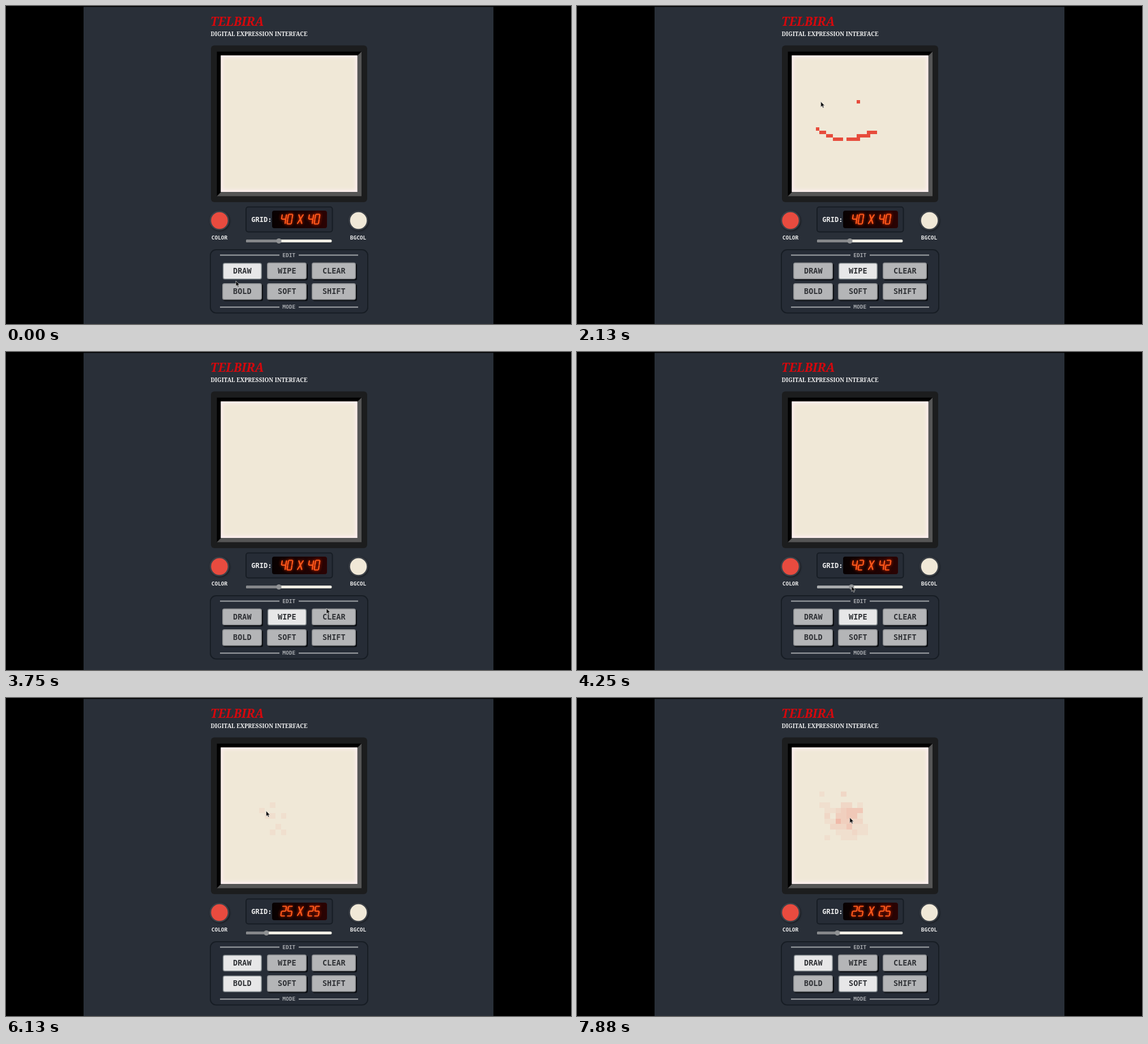
Recreate the animation shown at these times as an HTML page. Size 998 px wide and 561 px high, loop 8000 ms.

```html
<!DOCTYPE html>
<html lang="en">
<head>
<meta charset="utf-8">
<title>Pixel sketch pad</title>
<style>
  html, body { margin: 0; width: 100%; height: 100%; overflow: hidden; background: #000; }
  svg { display: block; width: 998px; height: 561px; }
  text { font: bold 9.5px "DejaVu Sans Mono", monospace; fill: #eee; text-anchor: middle; }
  .title { font: italic bold 21.1px "Noto Serif", serif; fill: #d4080d; text-anchor: start; }
  .sub { font: bold 9.95px "Noto Serif", serif; fill: #f2f2f2; text-anchor: start; }
  .grid { font-size: 12px; }
  .rule { fill: #a6a9ad; }
  .key { font-size: 13.5px; fill: #303236; }
  .box { fill: #262c36; stroke: #171d24; stroke-width: 2; }
  .knob { stroke: #3c4148; stroke-width: 2.6; filter: drop-shadow(1px 1px 1.5px #0008); }
  #led path { fill: none; stroke: #ff5a1c; stroke-width: 2.2; stroke-linecap: round; }
  #led { filter: drop-shadow(0 0 2.5px #f30); }
</style>
</head>
<body>
<svg viewBox="0 0 998 561">
  <defs>
    <linearGradient id="ledBack"><stop stop-color="#070101"/><stop offset="1" stop-color="#2b0303"/></linearGradient>
    <filter id="blur" x="-10%" y="-10%" width="120%" height="120%"><feGaussianBlur stdDeviation="3"/></filter>
    <clipPath id="paper"><rect x="379.5" y="87.2" width="241" height="240.8"/></clipPath>
  </defs>
  <rect x="137" y="1.5" width="724" height="559.5" fill="#292f38"/>
  <text class="title" x="361" y="35">TELBIRA</text>
  <text class="sub" x="361.5" y="52.6">DIGITAL EXPRESSION INTERFACE</text>

  <rect x="362" y="69.5" width="276" height="276.5" rx="6" fill="#1c1d1e"/>
  <path d="M372.5 80.5H628L620.5 88V328H380L372.5 335.5Z" fill="#000"/>
  <path d="M628 80.5V335.5H372.5L380 328H620.5V88Z" fill="#555"/>
  <g clip-path="url(#paper)">
    <rect x="379" y="87" width="242" height="242" fill="#f0e8d7"/>
    <rect x="378" y="86" width="244" height="243" fill="none" stroke="#fff0f4" stroke-width="8" filter="url(#blur)"/>
    <g id="cells" fill="#e74c3c" shape-rendering="crispEdges"></g>
  </g>

  <circle class="knob" cx="377" cy="378.5" r="16" fill="#e84b3f"/>
  <circle class="knob" cx="622.5" cy="378.5" r="16" fill="#f0e8d7"/>
  <text x="377" y="411.7">COLOR</text>
  <text x="622" y="411.7">BGCOL</text>

  <rect class="box" x="424" y="354.5" width="152.5" height="44" rx="4"/>
  <text class="grid" x="451.3" y="381">GRID:</text>
  <rect x="470" y="361" width="97" height="31" rx="4" fill="url(#ledBack)"/>
  <g id="led"></g>

  <rect x="424" y="412" width="151.5" height="5" rx="2.5" fill="#f0ede4"/>
  <rect id="track" x="424" y="412" height="5" rx="2.5"/>
  <circle id="thumb" cy="414.5" r="4.6" fill="#909294"/>

  <rect class="box" x="361" y="430" width="278" height="111.5" rx="10"/>
  <path d="M378 439.5H483M517 439.5H622M378 531.2H483M517 531.2H622" stroke="#a0a3a7" stroke-width="2"/>
  <text class="rule" x="499.7" y="442.6">EDIT</text>
  <text class="rule" x="499.7" y="534.4">MODE</text>
  <g id="keys"></g>
  <path id="cursor" d="M0 0V9.4L2.2 7.5L3.7 10.8L5.3 10.1L3.9 6.9H6.7Z" fill="#0c0c0c" stroke="#ddd" stroke-width=".7"/>
</svg>
<script>
const LOOP = 8000, STEP = 125;
const $ = id => document.getElementById(id);
const paper = { x: 379.5, y: 87.5, size: 241 };
const between = (t, from, to) => t >= from && t < to;

// Buttons
const keys = [["DRAW", "WIPE", "CLEAR"], ["BOLD", "SOFT", "SHIFT"]].flatMap((row, r) =>
  row.map((label, c) => ({ label, x: 382 + 79 * c, y: 452.5 + 36.5 * r, w: c < 2 ? 70 : 78 })));
const lit = {
  DRAW: t => !between(t, 1875, 5375),
  WIPE: t => between(t, 1875, 5500),
  CLEAR: t => t === 3500,
  BOLD: t => between(t, 5125, 7500),
  SOFT: t => t >= 7500,
  SHIFT: () => false
};

// Places the pointer visits
const middle = (col, row) => [paper.x + (col + .5) * paper.size / 40, paper.y + (row + .5) * paper.size / 40];
const smileRow = c => Math.round(24.2 - (c < 15 ? .0516 : .03) * (c - 15) ** 2);
const onSmile = c => middle(c, smileRow(c));
const onKey = name => {
  const k = keys.find(k => k.label === name);
  return [k.x + k.w / 2 + 15, k.y + 13];
};
const thumbX = size => 482 + (size - 40) * 1.47;
const onThumb = size => [thumbX(size), 413];
const eyes = [middle(8, 13), middle(19, 13)];

function scribble(t) {
  const s = (t - 7875) / 1000;
  return [475 + 22 * Math.sin(.32 + 7.81 * s), 206 + 28 * Math.sin(.18 + 16.12 * s)];
}

const stops = [
  [0, 406, 485], [500, ...eyes[0]], [625, ...eyes[0]], [1000, ...eyes[1]],
  [1125, ...onSmile(7)], [1375, ...onSmile(24)], [1500, 528, 441], [1875, ...onKey("WIPE")],
  [2125, ...eyes[0]], [2500, ...eyes[1]], [2875, ...onSmile(16)], [3125, ...onSmile(22)],
  [3250, ...onSmile(24)], [3500, ...onKey("CLEAR")], [3625, ...onKey("CLEAR")],
  [4125, ...onThumb(40)], [4250, ...onThumb(42)], [4500, ...onThumb(42)], [4875, ...onThumb(25)],
  [5125, ...onKey("BOLD")], [5375, ...onKey("DRAW")], [6000, ...scribble(6000)],
  [7125, ...scribble(7125)], [7500, ...onKey("SOFT")], [7625, ...scribble(7625)]
];
const sizes = [[0, 40], [4125, 40], [4250, 42], [4500, 42], [4875, 25]];

function at(track, t) {
  const i = track.findIndex(k => k[0] > t);
  if (i < 0) return track[track.length - 1].slice(1);
  const a = track[i - 1], b = track[i], f = (t - a[0]) / (b[0] - a[0]);
  return a.slice(1).map((v, j) => v + (b[j + 1] - v) * f);
}

const pointer = t => between(t, 6000, 7126) || t >= 7625 ? scribble(t) : at(stops, t);

// Airbrush: a seeded cloud of faint cells around a centre, appearing over time
let seed = 7;
const random = () => (seed = seed * 16807 % 2147483647) / 2147483647;
const spread = () => (random() + random() + random()) / 1.5 - 1;
const spray = (count, start, span, col, row, reach) => Array.from({ length: count }, (_, i) => ({
  time: start + span * i / count,
  col: Math.floor(col + reach * spread()),
  row: Math.floor(row + reach * spread())
}));
const stamps = [...spray(70, 6000, 1125, 9.4, 12.9, 5), ...spray(18, 7625, 250, 11.2, 12.2, 3)];

function cell(n, col, row, alpha = 1) {
  const s = paper.size / n;
  return `<rect x="${paper.x + col * s}" y="${paper.y + row * s}" width="${s}" height="${s}" opacity="${alpha}"/>`;
}

function face(t) {
  let out = "";
  if (between(t, 625, 2125)) out += cell(40, 8, 13);
  if (between(t, 1000, 2500)) out += cell(40, 19, 13);
  for (let c = 7; c < 25; c++) {
    const drawn = 1125 + (c - 7) * 14.5;
    const wiped = c < 16 ? 3625 : 2875 + (c - 16) * 41;
    if (c === 15 || !between(t, drawn, wiped)) continue;
    // the rising half also fills the corner of each step
    const rows = new Set([smileRow(c), smileRow(c > 15 && c < 24 ? c + 1 : c)]);
    for (const row of rows) out += cell(40, c, row);
  }
  return out;
}

const clouds = t => stamps.filter(s => t >= s.time).map(s => cell(25, s.col, s.row, .055)).join("");

// Seven-segment display
const segments = {
  a: "M1 0H6.5", b: "M7.5 1V7.5", c: "M7.5 9.5V16", d: "M1 17H6.5", e: "M0 9.5V16", f: "M0 1V7.5",
  g: "M1 8.5H6.5", x: "M0 1L7.5 16M7.5 1L0 16"
};
const glyphs = { 0: "abcdef", 1: "bc", 2: "abged", 3: "abgcd", 4: "fgbc", 5: "afgcd",
  6: "afgecd", 7: "abc", 8: "abcdefg", 9: "abcdfg", X: "x", " ": "" };

function led(size) {
  let x = 488;
  return [...`${size} X ${size}`].map(ch => {
    const d = [...glyphs[ch]].map(s => segments[s]).join("");
    const mark = `<path transform="translate(${x} 367.5) skewX(-9)" d="${d}"/>`;
    x += ch === " " ? 7.5 : 11;
    return mark;
  }).join("");
}

function key({ label, x, y, w }, t, [px, py]) {
  const on = lit[label](t);
  const over = between(px, x, x + w) && between(py, y, y + 29);
  const fill = on ? (over ? "#f5f5f5" : "#e7e7e8") : (over ? "#c4c5c6" : "#b4b5b7");
  const push = on ? .8 : 0;
  const shadow = on ? "" : `<rect x="${x + 2}" y="${y + 2}" width="${w}" height="29.5" rx="3" fill="#0b0e12"/>`;
  return `${shadow}<rect x="${x + .75 + push}" y="${y + .75 + push / 2}" width="${w - 1.5 - push}" height="28" rx="3"
    fill="${fill}" stroke="${on ? "#7d8488" : "#8b8d90"}" stroke-width="1.5"/>
    <text class="key" x="${x + w / 2 + .3}" y="${y + 19 + (on && over ? .7 : 0)}">${label}</text>`;
}

let last = -1;
function frame(now) {
  const t = Math.floor(now % LOOP / STEP) * STEP;
  if (t !== last) {
    last = t;
    const pos = pointer(t), size = Math.round(at(sizes, t)[0]), x = thumbX(size);
    $("cells").innerHTML = face(t) + clouds(t);
    $("led").innerHTML = led(size);
    $("track").setAttribute("width", x - 424);
    $("track").setAttribute("fill", between(t, 4125, 5000) ? "#a9abad" : "#85878a");
    $("thumb").setAttribute("cx", x);
    $("keys").innerHTML = keys.map(k => key(k, t, pos)).join("");
    $("cursor").setAttribute("transform", `translate(${pos})`);
  }
  requestAnimationFrame(frame);
}
frame(0);
</script>
</body>
</html>
```
